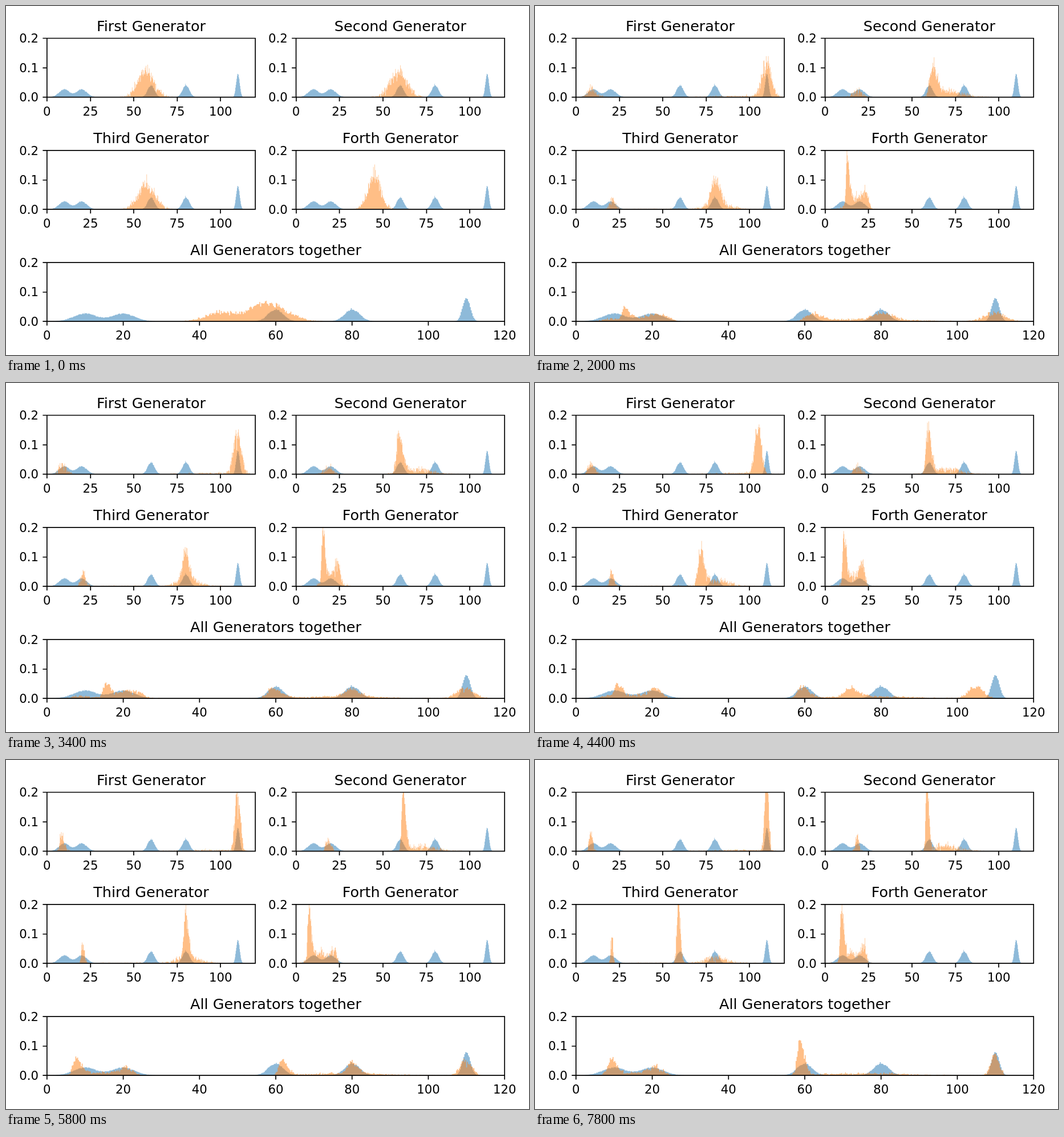
An HTML page that plays this animation: 917 px wide and 611 px high, repeating every 8 s.

```html
<!DOCTYPE html>
<html lang="en">
<head>
<meta charset="utf-8">
<title>Generator histograms</title>
<style>
  html, body { margin: 0; width: 100%; height: 100%; overflow: hidden; background: #fff; }
  svg { display: block; width: 917px; height: 611px; font: 27.78px "DejaVu Sans", sans-serif; }
  .title { font-size: 33.33px; }
  .axis { fill: none; stroke: #000; stroke-width: 2.22; }
  .real { fill: #1f77b4; fill-opacity: .5; }
  .fake { fill: #ff7f0e; fill-opacity: .5; }
</style>
</head>
<body>
<svg id="stage" viewBox="0 0 1200 800" preserveAspectRatio="none"></svg>
<script>
const STEP = 0.2, STEPS = 40; // seconds per picture, pictures per loop
const X_MAX = 120, Y_MAX = 0.2, BINS = 500, BIN = X_MAX / BINS;
const REAL_SAMPLES = 100000, FAKE_SAMPLES = 2000;

const clamp = x => Math.min(1, Math.max(0, x));
const mix = (a, b, p) => a + (b - a) * p;

// A two-sided bell: mode, left and right sigma, share of the samples.
const bell = (at, left, right, share, motion) =>
  ({ at, left, right, share, sway: 0, fall: 0, to: at, sharpens: false, ...motion });

const real = [10, 20, 60, 80, 110].map((at, i) => {
  const sigma = [3, 3, 2, 2, 1][i];
  return bell(at, sigma, sigma, .2);
});

// The first bell of each generator starts as the whole hump; the others grow out of it.
const generators = [
  {
    start: 57, width: 4.5, peak: 0, period: 1,
    bells: [
      bell(109.7, 2.6, 2.8, 0, { sharpens: true, fall: 5 }),
      bell(8.3, 1.8, 3.2, .17, { sharpens: true }),
      bell(98, 14, 8, .08)
    ]
  },
  {
    start: 59, width: 4.8, peak: 5.7, period: 3.7,
    bells: [
      bell(60, 1.4, 2.8, 0, { sharpens: true, sway: 1.6 }),
      bell(18.5, 2.5, 2.8, .14, { sharpens: true }),
      bell(70, 6, 8, .3, { sway: 2 })
    ]
  },
  {
    start: 57.3, width: 4.7, peak: 0, period: 1,
    bells: [
      bell(80, 2.1, 2.8, 0, { sharpens: true, fall: 8, to: 59 }),
      bell(20.5, 1.3, 2, .14, { sharpens: true }),
      bell(80, 5, 7, .3),
      bell(60, 25, 20, .05)
    ]
  },
  {
    start: 45, width: 3.7, peak: 3.2, period: 6.6,
    bells: [
      bell(10.8, .6, 1.4, 0, { sway: 4.6, fall: 2 }),
      bell(16, 4, 4, .36, { sway: 4, fall: 1 }),
      bell(23, 2, 1.2, .22, { sway: 1.4, fall: 2 })
    ]
  }
];

function mixtureAt({ start, width, peak, period, bells }, t) {
  const learned = 1 - (1 - clamp(t / 2)) ** 2;
  const sharpness = 1 - .6 * clamp((t - 2) / 5);
  const setback = Math.exp(-(((t - 4.4) / .5) ** 2));
  const moved = clamp((t - 6) / .8);
  const swing = Math.cos(2 * Math.PI * (t - peak) / period);
  const others = bells.reduce((sum, b) => sum + b.share, 0);
  return bells.map((b, i) => {
    const main = i === 0;
    const scale = b.sharpens ? sharpness : 1;
    const at = mix(b.at, b.to, moved) + b.sway * swing - b.fall * setback;
    return {
      at: main ? mix(start, at, learned) : at,
      left: main ? mix(width, b.left * scale, learned) : b.left * scale,
      right: main ? mix(width, b.right * scale, learned) : b.right * scale,
      share: main ? 1 - others * learned : b.share * learned
    };
  });
}

function density(mixture, x) {
  let sum = 0;
  for (const { at, left, right, share } of mixture) {
    const z = (x - at) / (x < at ? left : right);
    sum += share / (Math.sqrt(Math.PI / 2) * (left + right)) * Math.exp(-z * z / 2);
  }
  return sum;
}

function random(seed) {
  let a = seed * 7919 + 17;
  return () => {
    a = (a + 0x6D2B79F5) | 0;
    let t = Math.imul(a ^ (a >>> 15), 1 | a);
    t = (t + Math.imul(t ^ (t >>> 7), 61 | t)) ^ t;
    return ((t ^ (t >>> 14)) >>> 0) / 4294967296;
  };
}

// Density per bin with the counting noise of a finite sample.
function histogram(mixture, samples, seed) {
  const next = random(seed);
  return Array.from({ length: BINS }, (_, i) => {
    const expected = density(mixture, (i + .5) * BIN) * samples * BIN;
    const normal = Math.sqrt(-2 * Math.log(1 - next())) * Math.cos(2 * Math.PI * next());
    const count = Math.max(0, Math.round(expected + Math.sqrt(expected) * normal));
    return count / (samples * BIN);
  });
}

const stage = document.getElementById("stage");

function add(tag, attributes, text = "") {
  const node = document.createElementNS(stage.namespaceURI, tag);
  for (const name in attributes) node.setAttribute(name, attributes[name]);
  node.textContent = text;
  return stage.appendChild(node);
}

function barsPath({ left, right, top, bottom }, heights) {
  const width = (right - left) / BINS;
  return heights.map((height, i) => {
    if (!height) return "";
    const x = left + i * width;
    const y = mix(bottom, top, clamp(height / Y_MAX));
    return `M${x.toFixed(2)} ${bottom}V${y.toFixed(2)}h${width.toFixed(3)}V${bottom}z`;
  }).join("");
}

const realHeights = histogram(real, REAL_SAMPLES, 1);

// Draws the fixed parts of one plot and returns a function that sets its orange bars.
function addPanel(title, column, row, wide) {
  const left = column ? 665.5 : 94, right = column || wide ? 1144 : 572;
  const top = 74 + 257 * row, bottom = top + 135;
  const box = { left, right, top, bottom };
  add("path", { class: "real", d: barsPath(box, realHeights) });
  const fake = add("path", { class: "fake" });
  let axis = `M${left} ${top}H${right}V${bottom}H${left}z`;
  for (let value = 0; value <= X_MAX; value += wide ? 20 : 25) {
    const x = mix(left, right, value / X_MAX);
    axis += `M${Math.round(x)} ${bottom}v9.72`;
    add("text", { x, y: bottom + 42, "text-anchor": "middle" }, value);
  }
  for (const value of [0, .1, .2]) {
    const y = mix(bottom, top, value / Y_MAX);
    axis += `M${left} ${Math.round(y)}h-9.72`;
    add("text", { x: left - 19.4, y: y + 10.2, "text-anchor": "end" }, value.toFixed(1));
  }
  add("path", { class: "axis", d: axis });
  add("text", { class: "title", x: (left + right) / 2, y: top - 16.7, "text-anchor": "middle" }, title);
  return heights => fake.setAttribute("d", barsPath(box, heights));
}

const setBars = ["First", "Second", "Third", "Forth"].map((name, i) =>
  addPanel(`${name} Generator`, i % 2, Math.floor(i / 2), false));
const setAllBars = addPanel("All Generators together", 0, 2, true);

function draw(step) {
  const heights = generators.map((generator, g) =>
    histogram(mixtureAt(generator, step * STEP), FAKE_SAMPLES, 100 + step * 4 + g));
  heights.forEach((h, g) => setBars[g](h));
  setAllBars(heights[0].map((_, i) => heights.reduce((sum, h) => sum + h[i], 0) / heights.length));
}

let shown = -1;
const start = performance.now();
function tick() {
  const step = Math.floor((performance.now() - start) / 1000 / STEP) % STEPS;
  if (step !== shown) draw(shown = step);
  requestAnimationFrame(tick);
}
tick();
</script>
</body>
</html>
```
